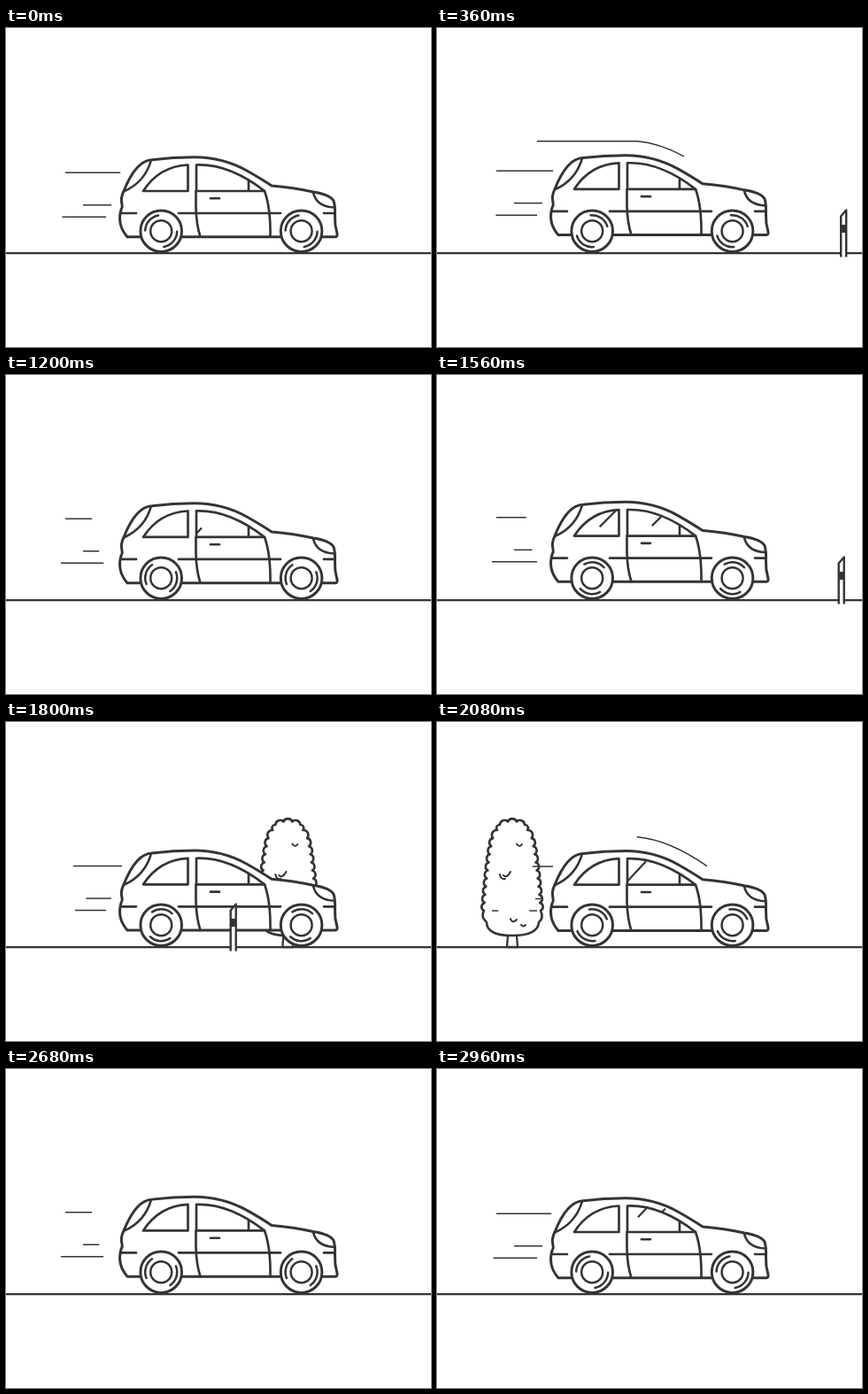
An HTML page with a canvas for the animation above (3000 ms loop, 480 px wide and 360 px high).

```html
<!DOCTYPE html>
<html lang="en">
<head>
<meta charset="utf-8">
<title>Driving car</title>
<style>
html, body { margin: 0; width: 100%; height: 100%; overflow: hidden; background: #fff; }
canvas { display: block; width: 480px; height: 360px; }
</style>
</head>
<body>
<canvas id="stage" width="480" height="360"></canvas>
<script>
const ctx = document.getElementById('stage').getContext('2d');
const INK = '#353338';
const LOOP = 3000, STEP = 40, SPAN = LOOP - STEP;
const BEAT = SPAN / 8;    // rhythm of the air streaks
const SPEED = 400 / 480;  // scenery, px per ms
const TAU = Math.PI * 2;

const clamp = v => Math.max(0, Math.min(1, v));

function draw(d, width, fill) {
  const path = new Path2D(d);
  if (fill) {
    ctx.fillStyle = fill;
    ctx.fill(path);
  }
  ctx.lineWidth = width;
  ctx.stroke(path);
}

// A dash leaves at `from` and again every `period`; its tail follows after `lag`.
const streaks = [
  { d: 'M131 163.3H67', len: 64, from: 165 - BEAT, period: BEAT, lag: 200, dur: 180 },
  { d: 'M119 199.8H87', len: 32, from: 195 - BEAT, period: BEAT, lag: 205, dur: 140 },
  { d: 'M113 213.3H62', len: 51, from: 200 - BEAT, period: BEAT, lag: 250, dur: 175 },
  { d: 'M305 163Q262 133 226 130H96', len: 217, from: 38, period: 1902, lag: 273, dur: 350 }
];
const glints = [
  { d: 'M203 154.5L174 183.5', len: 41, from: 1460, period: 840, lag: 150, dur: 150 },
  { d: 'M238 155.5L215 180', len: 33.6, from: 790, period: 1030, lag: 240, dur: 230 },
  { d: 'M258 157.5L238 177.5', len: 28.3, from: 600, period: 770, lag: 130, dur: 250 }
];

function drawDashes(list, t, width) {
  ctx.lineCap = 'butt';
  for (const s of list) {
    for (let lead = s.from; lead < t; lead += s.period) {
      const head = clamp((t - lead) / s.dur) * s.len;
      const tail = clamp((t - lead - s.lag) / s.dur) * s.len;
      if (head - tail < 0.3) continue;
      ctx.setLineDash([head - tail, 1000]);
      ctx.lineDashOffset = -tail;
      draw(s.d, width);
    }
  }
  ctx.setLineDash([]);
  ctx.lineCap = 'round';
}

// Scalloped crown, symmetric around x = 0.
function crownPath() {
  const right = [[5, 112.5], [14, 116]];
  for (let u = 0; u < 1.01; u += 0.1) {
    right.push([17 + 15 * Math.sqrt(u), 122 + 91 * u]);
  }
  const left = right.map(([x, y]) => [-x, y]).reverse();
  let prev = left[0];
  let d = `M${prev}`;
  for (const p of [...left.slice(1), ...right]) {
    const r = Math.hypot(p[0] - prev[0], p[1] - prev[1]) * 0.54;
    d += `A${r} ${r} 0 0 1 ${p}`;
    prev = p;
  }
  return d + 'Q36 221 30 226Q29 241 0 241Q-29 241 -29 226Q-36 220 -32 213Z';
}
const CROWN = crownPath();

function drawTree(x) {
  if (x < -60 || x > 540) return;
  ctx.save();
  ctx.translate(x, 0);
  draw('M-5 241L-6 254H6L5 241', 2.3, '#fff');
  draw(CROWN, 2.6, '#fff');
  draw('M5 137.5Q8 142 11 138M-14 172Q-13 178 -8 177M-10 173Q-6 177 -2 169' +
       'M-2 222Q0 228 5 223M10 229Q13 232 15 229', 2);
  ctx.restore();
}

function drawPost(x) {
  if (x < 20.5 || x > 490) return;
  ctx.save();
  ctx.translate(x, 0);
  ctx.lineCap = 'butt';
  draw('M1.2 258.5V212.5L7.2 205.5V258.5', 2.4, '#fff');
  ctx.fillStyle = INK;
  ctx.fillRect(1, 222, 6, 9);
  ctx.restore();
}

function drawWheel(x, angle) {
  const y = 229.2;
  const arc = (r, a, b) => {
    ctx.beginPath();
    ctx.arc(x, y, r, a, b);
  };
  arc(23.3, 0, TAU);
  ctx.fillStyle = '#fff';
  ctx.fill();
  ctx.lineWidth = 3;
  ctx.stroke();
  arc(12, 0, TAU);
  ctx.lineWidth = 2.5;
  ctx.stroke();
  for (const a of [angle, angle + Math.PI]) {
    arc(18, a - 0.68, a + 0.68);
    ctx.stroke();
  }
}

function drawBody(t) {
  // shell
  const rear = 'H137Q125 222 130 205Q132 202 131 199Q129 192 133 184Q147 149 165 148.7';
  const top = 'Q188 146 213 145.8Q245 146 272 161Q288 170 300 178Q325 180 347 185' +
              'Q366 188 370 195Q372 201 371.5 212Q371 222 374 232Q374.5 235.7 372 235.7';
  ctx.fillStyle = '#fff';
  ctx.fill(new Path2D('M152 235.7' + rear + top + 'Z'));
  draw('M152 235.7' + rear + top + 'H357M198 235.7H310', 3);
  // belt line, lights
  draw('M130 209H147M195 209H310M359 209H371', 2.7);
  draw('M164 149Q157 174 133 184.5M347 186Q351 202 371 202.5', 2.6);
  // windows and door
  draw('M155 184Q173 156 205.5 154.5V184Z', 2.7);
  draw('M215 184V154.5Q252 153 292 184ZM274 172V184', 2.7);
  draw('M214.5 184V203Q215 222 219.5 235.7M292 184Q299 203 298.5 235.7', 2.7);
  draw('M231 192.3H241', 2.6);
  drawDashes(glints, t, 2.2);
}

function render(t) {
  const turn = t / SPAN * TAU;
  const lift = 1.3 * (1 - Math.cos(turn * 3));
  const wheel = 41 * Math.PI / 180 + turn * 6;

  ctx.fillStyle = '#fff';
  ctx.fillRect(0, 0, 480, 360);
  ctx.strokeStyle = INK;
  ctx.lineCap = ctx.lineJoin = 'round';

  draw('M-5 254.2H485', 2.3);
  drawTree(85 - (t - 2080) * SPEED);

  ctx.save();
  ctx.translate(0, -lift);
  drawDashes(streaks, t, 1.5);
  drawBody(t);
  ctx.restore();

  drawWheel(175.2, wheel);
  drawWheel(333.6, wheel);

  drawPost(455 - (t - 360) * SPEED);
  drawPost(452.5 - (t - 1560) * SPEED);
}

const start = performance.now();
function tick() {
  const t = (performance.now() - start) % LOOP;
  render(Math.floor(t / STEP) * STEP);
  requestAnimationFrame(tick);
}
tick();
</script>
</body>
</html>
```
